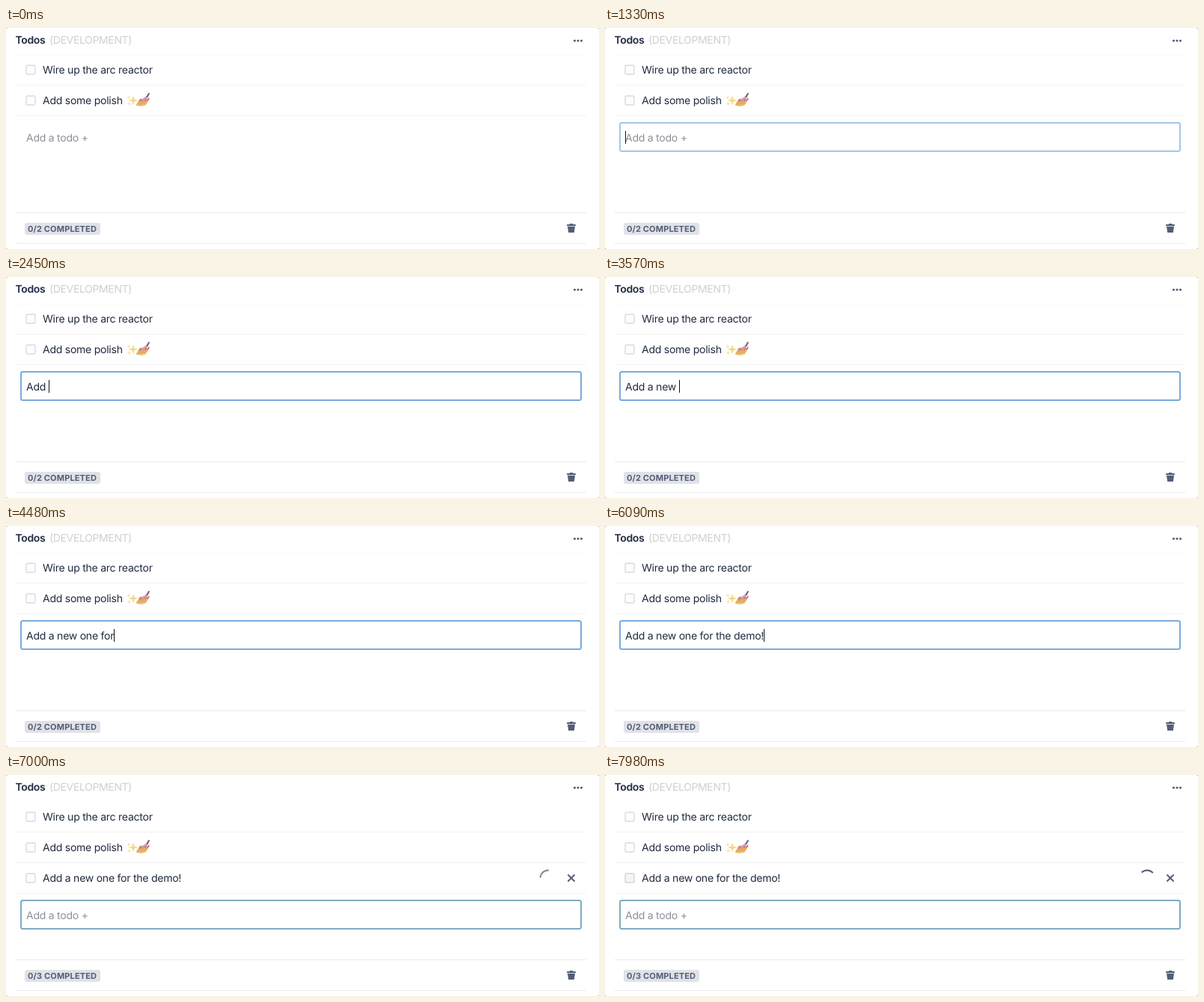
These frames come from a looping animation (792x296 px, 8 s). An HTML page with a canvas:

```html
<!DOCTYPE html>
<html lang="en">
<head>
<meta charset="utf-8">
<title>Todos</title>
<style>
  html, body { margin: 0; width: 100%; height: 100%; overflow: hidden; background: #fff; }
  canvas { display: block; }
</style>
</head>
<body>
<canvas id="stage" width="792" height="296"></canvas>
<script>
const ctx = document.getElementById('stage').getContext('2d');
const LOOP = 8000;
const FOCUS_AT = 1190, SUBMIT_AT = 6160, SPIN_AT = 6440, DISABLE_AT = 7280;
const BLINK = 500;
const ENTRY = 'Add a new one for the demo!';
// one time per typed character
const KEY_TIMES = [
  1890, 2170, 2310, 2450, 2590, 2730, 3080, 3150, 3290, 3430,
  3640, 3780, 3920, 4060, 4200, 4340, 4410, 4620, 4690, 4830,
  4900, 5040, 5390, 5460, 5530, 5600, 5880
];
const INK = '#202a40', SLATE = '#535e76', HINT = '#8b9099';

const clamp = v => Math.max(0, Math.min(1, v));

function setFont(size, weight, spacing) {
  ctx.font = `${weight} ${size}px Inter, "Open Sans", sans-serif`;
  ctx.letterSpacing = spacing + 'px';
  ctx.textRendering = 'geometricPrecision';
}

function label(str, x, y, color, size = 14, weight = 400, spacing = -0.24) {
  setFont(size, weight, spacing);
  ctx.fillStyle = color;
  ctx.fillText(str, x, y);
  return ctx.measureText(str).width;
}

function rounded(x, y, w, h, r) {
  ctx.beginPath();
  ctx.roundRect(x, y, w, h, r);
}

function rule(y, color) {
  ctx.fillStyle = color;
  ctx.fillRect(13, y, 762, 1);
}

function stroke(color, width, ...points) {
  ctx.strokeStyle = color;
  ctx.lineWidth = width;
  ctx.lineCap = 'round';
  ctx.beginPath();
  points.forEach(([x, y], i) => i ? ctx.lineTo(x, y) : ctx.moveTo(x, y));
  ctx.stroke();
}

function polygon(color, ...points) {
  ctx.fillStyle = color;
  ctx.beginPath();
  points.forEach(([x, y]) => ctx.lineTo(x, y));
  ctx.fill();
}

function sparkle(x, y, r, color) {
  ctx.fillStyle = color;
  ctx.beginPath();
  for (let i = 0; i < 8; i++) {
    const d = i % 2 ? r * 0.32 : r, a = i * Math.PI / 4;
    ctx.lineTo(x + d * Math.cos(a), y + d * Math.sin(a));
  }
  ctx.fill();
}

function polishEmoji() {
  sparkle(170, 97, 6.5, '#f3d982');
  sparkle(164, 93, 3, '#f6e3a3');
  sparkle(164.5, 101.5, 3, '#f6e3a3');
  polygon('#efc578', [174, 104], [178, 95], [186, 94], [190, 98], [186, 104], [180, 105]);
  for (let i = 0; i < 4; i++) {
    const x = 175.5 + i * 3.4, y = 102.5 - i * 0.4;
    stroke('#e3ab63', 2.6, [x, y], [x + 4.5, y - 6]);
    stroke('#c9709c', 1.8, [x + 3.4, y - 4.6], [x + 5, y - 6.8]);
  }
  stroke('#cfa0b8', 2.6, [183, 96], [188.5, 92]);
  stroke('#77647c', 2.2, [188.5, 92], [190.8, 88]);
}

function checkbox(y, disabled) {
  rounded(27, y - 6, 12, 12, 2);
  ctx.fillStyle = disabled ? '#f3f4f6' : '#fdfdfe';
  ctx.fill();
  ctx.strokeStyle = disabled ? '#dcdde0' : '#e1e3e8';
  ctx.lineWidth = 1.8;
  ctx.stroke();
}

function todo(str, y, disabled) {
  checkbox(y, disabled);
  label(str, 49, y + 5, INK);
  rule(y + 20, '#f2f3f5');
}

function spinner(t) {
  const age = t - SPIN_AT;
  if (age < 0) return;
  const start = (187 + (t - 7000) * 360 / 875) * Math.PI / 180;
  ctx.globalAlpha = Math.sqrt(clamp(age / 1000));
  ctx.strokeStyle = '#5a657b';
  ctx.lineWidth = 2.2;
  ctx.lineCap = 'round';
  ctx.beginPath();
  ctx.arc(724, 138, 10.4, start, start + 1.45);
  ctx.stroke();
  ctx.globalAlpha = 1;
}

function inputField(t, top) {
  const focus = clamp((t - FOCUS_AT) / 210);
  const submitted = t >= SUBMIT_AT;
  if (focus > 0) {
    ctx.globalAlpha = focus;
    rounded(20, top + 1, 748, 38, 2.5);
    ctx.strokeStyle = submitted ? '#80abc3' : '#7aabdc';
    ctx.lineWidth = 2;
    ctx.stroke();
    ctx.globalAlpha = 1;
  }

  const count = submitted ? 0 : KEY_TIMES.filter(k => k <= t).length;
  const baseline = top + 26;
  let caretX = 27;
  if (count) caretX += label(ENTRY.slice(0, count), 27, baseline, INK);
  else label('Add a todo +', 27, baseline, HINT);

  const lastEvent = submitted ? SUBMIT_AT : count ? KEY_TIMES[count - 1] : FOCUS_AT;
  const caretOn = t >= FOCUS_AT && Math.floor((t - lastEvent) / BLINK) % 2 === 0;
  if (caretOn) {
    ctx.fillStyle = '#111';
    ctx.fillRect(Math.round(caretX), top + 12, 1, 17);
  }
}

function header() {
  label('Todos', 12.5, 21, INK, 14, 600, -0.35);
  label('(DEVELOPMENT)', 58, 21, '#cfcfd1', 14, 400, -0.35);
  ctx.fillStyle = SLATE;
  for (const x of [759.5, 764, 768.5]) {
    ctx.beginPath();
    ctx.arc(x, 17, 1.6, 0, Math.PI * 2);
    ctx.fill();
  }
  rule(36, '#fafafb');
}

function footer(total) {
  rule(247, '#e9eaed');
  rule(288, '#e9eaed');
  rounded(25, 261, 101, 16, 3);
  ctx.fillStyle = '#e0e2e8';
  ctx.fill();
  label(`0/${total} COMPLETED`, 29, 273, SLATE, 11, 700, 0.15);

  ctx.fillStyle = SLATE;
  rounded(749, 263, 12, 2.2, 1);
  ctx.fill();
  ctx.fillRect(753, 262, 4, 2);
  polygon(SLATE, [750, 266], [760, 266], [758.8, 274], [751.2, 274]);
}

function draw(t) {
  ctx.fillStyle = '#b5b5b5';
  ctx.fillRect(0, 0, 792, 296);
  ctx.fillStyle = '#fff';
  rounded(0, 0, 792, 296, 3);
  ctx.fill();

  const added = t >= SUBMIT_AT;
  header();
  todo('Wire up the arc reactor', 56);
  todo('Add some polish', 97);
  polishEmoji();
  if (added) {
    todo(ENTRY, 138, t >= DISABLE_AT);
    stroke(SLATE, 1.9, [751, 134], [759, 142]);
    stroke(SLATE, 1.9, [759, 134], [751, 142]);
    spinner(t);
  }
  inputField(t, added ? 167 : 126);
  footer(added ? 3 : 2);
}

const began = performance.now();
function tick() {
  draw((performance.now() - began) % LOOP);
  requestAnimationFrame(tick);
}
tick();
</script>
</body>
</html>
```
